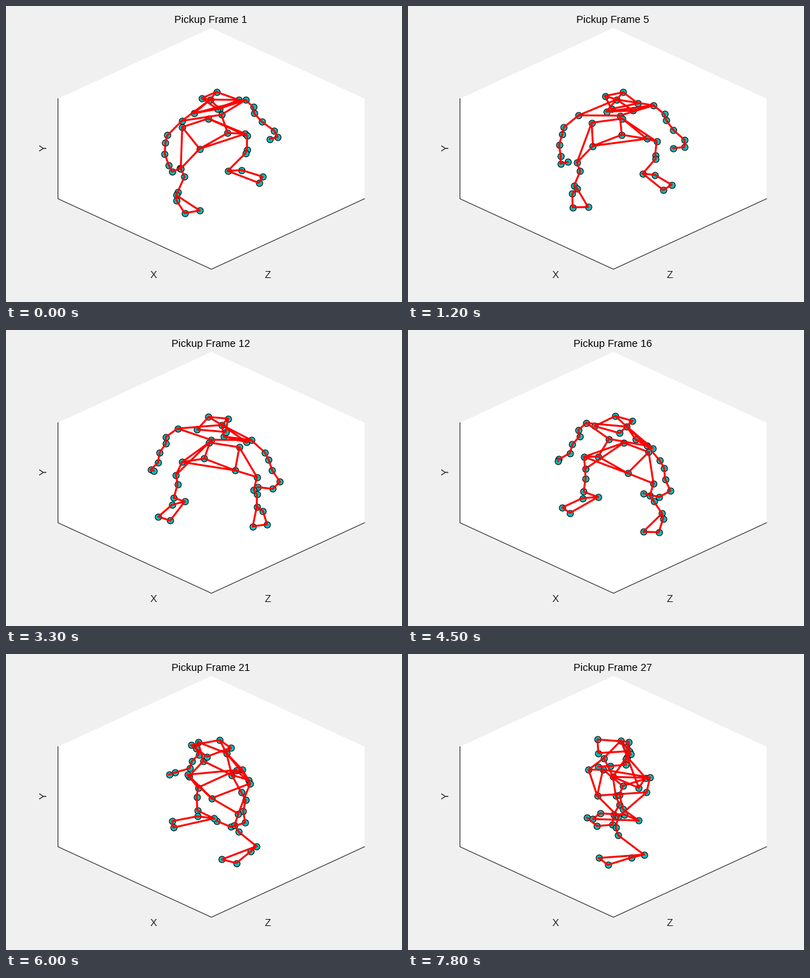
A matplotlib script for the animation above (8000 ms loop, 560 by 420 pixels).

```python
import matplotlib.pyplot as plt
import numpy as np
from matplotlib.animation import FuncAnimation

W, H, DPI = 560, 420, 80
PT = 72 / DPI                     # points per pixel
TICK, TICKS_PER_POSE = 100, 3     # ms, ticks each pose is held
TICKS = 80
TILT = 0.47                       # vertical squash of the ground plane

# The figure turns about a vertical axis. Per part: its twist in degrees, then
# for each marker (half width, forward, height, axis x, right side raise).
paired = [
    (2, dict(FHD=(20.5, 27, 131, 296), BHD=(14, -15, 132, 298))),
    (10, dict(PSI=(22.5, -46, 184, 294.5), ASI=(39.5, 22, 184, 294))),
    (10, dict(SHO=(55, -1, 149, 295), UPA=(74, -8, 167, 294),
              ELB=(76.5, -12, 178, 295.5), FRM=(84, -4, 189, 296),
              WRA=(91, 4, 200.5, 303), WRB=(91, 21, 203, 298),
              FIN=(77.5, 31, 198, 292.5))),
    (7, dict(THI=(59.5, -4, 209.5, 297, 6), KNE=(56, 0, 223.5, 297, 3),
             TIB=(61, -6, 239, 295, 10))),
    (0, dict(HEE=(51.6, -31, 262, 299.5), ANK=(65, -14, 259.5, 297.5),
             TOE=(77.8, 18, 262.5, 295.5), MT5=(59, 29.5, 261.3, 295.5))),
]
# Single trunk markers: (sideways, forward, height, axis x).
TRUNK_TWIST = 10
trunk = dict(C7=(7, -17.5, 142, 293.5), T10=(4, -47, 172, 290),
             RBAC=(37.6, -38, 171, 293), CLAV=(1, 17, 148.5, 294.5),
             STRN=(0, 37, 166.5, 292.7))

limbs = ["SHO UPA ELB FRM WRA WRB FIN",
         "THI KNE TIB HEE ANK TOE MT5 HEE",
         "ASI PSI THI ASI"]
chains = [[side + m for m in limb.split()] for limb in limbs for side in "LR"]
chains += [chain.split() for chain in (
    "LBHD RBHD RFHD LFHD LBHD C7 RBHD",
    "LSHO C7 RSHO CLAV LSHO",
    "C7 T10 RBAC C7",
    "T10 RSHO RBAC",
    "CLAV STRN LASI RASI STRN",
    "LPSI RPSI",
)]

markers = {name: (*spec, TRUNK_TWIST) for name, spec in trunk.items()}
for twist, part in paired:
    for name, (width, forward, height, axis, *lift) in part.items():
        for side, sign in (("L", -1), ("R", 1)):
            raised = height - sign * sum(lift)
            markers[side + name] = (sign * width, forward, raised, axis, twist)
names = list(markers)
sideways, forward, height, axis, twist = np.array(list(markers.values()), float).T


def pose(n):
    """Screen positions of all markers at pose n; the turn speeds up slightly."""
    step = n - 1
    angle = np.radians(-45 + 4.75 * step + 0.011 * step ** 2 + twist)
    x = axis + sideways * np.cos(angle) - forward * np.sin(angle)
    y = height + TILT * (sideways * np.sin(angle) + forward * np.cos(angle))
    return np.column_stack([x, y]) - 0.5


def bones(points):
    """All chains as one polyline, separated by NaN gaps."""
    gap = [[np.nan, np.nan]]
    return np.concatenate([part for chain in chains
                           for part in (points[[names.index(m) for m in chain]], gap)])


plt.rcParams["font.family"] = "Liberation Sans"
plt.rcParams["font.size"] = 14.67 * PT

fig = plt.figure(figsize=(W / DPI, H / DPI), dpi=DPI, facecolor="#f0f0f0")
ax = fig.add_axes([0, 0, 1, 1])
ax.set(xlim=(0, W), ylim=(H, 0))
ax.axis("off")

DARK = "#262626"
ax.fill([290.5, 507, 507, 290.5, 73.5, 73.5], [31, 131.5, 273.5, 373.5, 273.5, 131.5],
        color="white", lw=0)
ax.plot([73.5, 73.5, 290.5, 507], [131.5, 273.5, 373.5, 273.5], color=DARK, lw=1 * PT)

title = ax.text(290, 24, "", ha="center", va="baseline", color="black")
ax.text(209, 386, "X", ha="center", va="baseline", color=DARK)
ax.text(370.5, 386, "Z", ha="center", va="baseline", color=DARK)
ax.text(53.5, 201.5, "Y", ha="center", va="center", rotation=90, color=DARK)

dots, = ax.plot([], [], "o", ms=9 * PT, mfc=(0, 0.75, 0.75), mec="black", mew=1 * PT)
bone_line, = ax.plot([], [], color="red", lw=2.67 * PT, solid_joinstyle="round")


def draw(tick):
    n = tick // TICKS_PER_POSE + 1
    points = pose(n)
    title.set_text(f"Pickup Frame {n}")
    dots.set_data(*points.T)
    bone_line.set_data(*bones(points).T)
    return title, dots, bone_line


anim = FuncAnimation(fig, draw, frames=TICKS, interval=TICK, repeat=True, repeat_delay=0)
plt.show()
```
